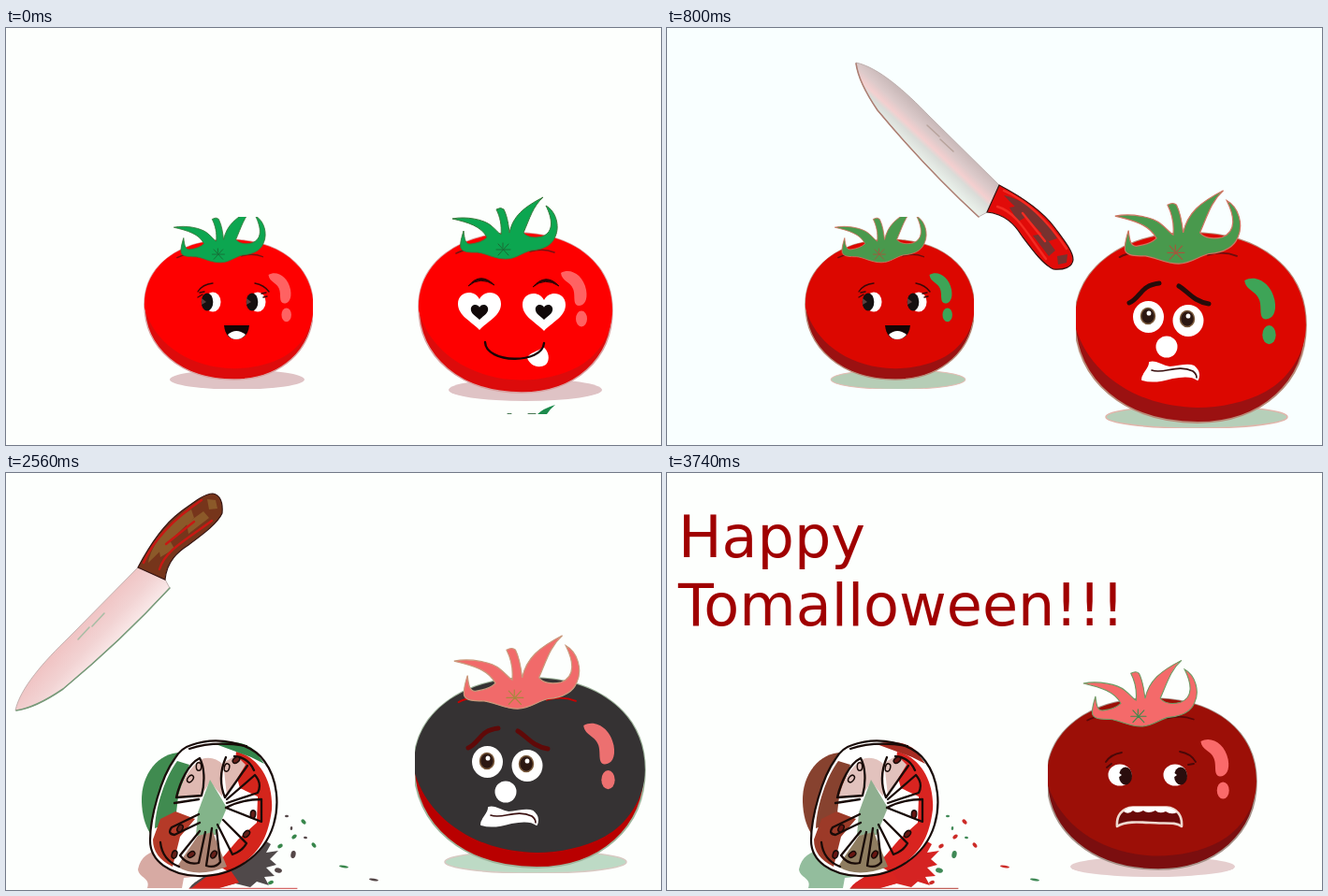
These frames come from a looping animation (700x446 px, 4.1 s). An HTML page:

```html
<!DOCTYPE html>
<html lang="en">
<head>
<meta charset="utf-8">
<title>Tomatoes</title>
<style>
html, body { margin: 0; width: 100%; height: 100%; overflow: hidden; background: #fdfffd; }
svg { display: block; width: 100vw; height: 100vh; }
text { font: 62px "DejaVu Sans", sans-serif; fill: #a00000; }
</style>
</head>
<body>
<svg id="stage" viewBox="0 0 700 446">
  <defs>
    <clipPath id="cutLeft"><path d="M100 202H328V386H100Z"/></clipPath>
    <clipPath id="cutBig"><path d="M437 150H700V428H437Z"/></clipPath>
    <clipPath id="cutLast"><path d="M407 190H700V432H407Z"/></clipPath>
    <linearGradient id="steelA" gradientUnits="userSpaceOnUse" x1="318" y1="131" x2="289" y2="162">
      <stop offset="0" stop-color="#c9b9b9"/><stop offset=".3" stop-color="#dccaca"/>
      <stop offset=".5" stop-color="#f4cfcf"/><stop offset=".62" stop-color="#d9dcd8"/><stop offset="1" stop-color="#edf5ee"/>
    </linearGradient>
    <linearGradient id="steelB" gradientUnits="userSpaceOnUse" x1="318" y1="131" x2="289" y2="162">
      <stop offset="0" stop-color="#f0c4c4"/><stop offset=".5" stop-color="#f2d3d3"/><stop offset="1" stop-color="#faeaea"/>
    </linearGradient>
  </defs>
</svg>
<script>
const stage = document.getElementById("stage");

const path = (d, fill, more = "") => `<path d="${d}" fill="${fill}" ${more}/>`;
const line = (d, color, width) =>
  path(d, "none", `stroke="${color}" stroke-width="${width}" stroke-linecap="round" stroke-linejoin="round"`);
const oval = (x, y, rx, ry, fill, more = "") =>
  `<ellipse cx="${x}" cy="${y}" rx="${rx}" ry="${ry}" fill="${fill}" ${more}/>`;
const group = (attrs, ...parts) => `<g ${attrs}>${parts.join("")}</g>`;

const BODY = "M545 219C607 219 648 252 648 302C648 354 608 390 551 390C486 390 441 352 441 298C441 251 484 219 545 219Z";
const LIT = "M545 219C607 219 648 252 648 302C648 328 632 351 612 362C590 374 562 378 540 376C492 372 452 344 441 302V298C441 251 484 219 545 219Z";
const LEAF = "M477 204C492 201 511 205 518 211C523 215 526 219 529 221C530 211 528 202 524 194Q529 191 532 194" +
  "C536 202 537 211 538 219C542 201 553 192 574 181C563 191 560 203 553 219C557 224 565 225 573 223" +
  "C586 218 584 204 577 190C588 196 592 212 587 223C583 234 572 237 561 238C552 240 545 247 534 247" +
  "C522 247 513 241 504 240C495 240 488 240 486 235C485 230 487 224 489 217C490 226 491 232 497 231" +
  "C504 230 510 228 514 224C508 212 494 208 477 204Z";

function tomato(place, c) {
  return group(`transform="matrix(${place})"`,
    path(BODY, c.shade, `stroke="${c.edge}" stroke-width="1.6"`),
    path(LIT, c.body),
    line("M481 241C490 236 498 237 506 240M560 239Q574 235 586 240", c.dark, 1.6),
    path(LEAF, c.leaf, `stroke="${c.vein}" stroke-width="1"`),
    line("M526 231L537 243M537 231L526 243M524 237H539M531 230V235", c.star, 1),
    path("M593 262C603 256 617 264 620 280C622 291 618 297 612 297C605 296 609 286 606 279C603 271 594 271 593 262Z", c.shine),
    oval(615, 311, 6, 8.5, c.shine));
}

const bright = { body: "#fe0000", shade: "#dc0b0b", edge: "#d9a0a0", leaf: "#0ca650", vein: "#3b7a3c", star: "#1a6a35", dark: "#7a1010", shine: "#ff6262" };
const dull = { body: "#dc0700", shade: "#9b1111", edge: "#b98a78", leaf: "#49994d", vein: "#cf7460", star: "#a4573c", dark: "#6d0c0c", shine: "#3ea457" };
const black = { body: "#353233", shade: "#b90000", edge: "#9fb59c", leaf: "#f16a6a", vein: "#c99a7c", star: "#a9873f", dark: "#c80000", shine: "#ec7070" };
const deep = { body: "#9c0f07", shade: "#7b0e0f", edge: "#a6938a", leaf: "#f46a6a", vein: "#6d9a63", star: "#3f8a4c", dark: "#5b0808", shine: "#fa6a6a" };

const SMALL = ".872 0 0 .875 -236.6 34.7";
const BIG = "1.193 0 0 1.187 -90.2 -41";
const LAST = "1.082 0 0 1.07 -71.2 6.7";

function happyTomato(c, shadow, rim) {
  const eye = x => oval(x + 6, 293, 8.5, 10.5, "#fff") + oval(x, 293, 6.3, 9.5, "#151010") +
    path(`M${x - 1} 293l-5 -4v7Z`, "#5a4040");
  return group('clip-path="url(#cutLeft)"',
    oval(247, 376, 72, 10.5, shadow, `stroke="${rim}"`),
    tomato(SMALL, c),
    eye(215), eye(263),
    line("M205 282Q210 274 221 273M205 288L210 285M207 283L212 282M266 273Q276 275 281 282M273 284L278 283M275 288L279 287", "#3a0808", 1.4),
    path("M233 318H260C259 328 254 333 246 333C238 333 234 327 233 318Z", "#140505"),
    path("M237 328Q246 320 256 328Q252 333 246 333T237 328Z", "#fff"));
}

function heart(x, y, s, fill) {
  return path("M0 20C-8 11 -23 5 -23 -8C-23 -22 -5 -24 0 -13C5 -24 23 -22 23 -8C23 5 8 11 0 20Z", fill,
    `transform="translate(${x} ${y}) scale(${s})"`);
}

function loveTomato() {
  return [
    oval(555, 387, 82, 12, "#dfc3c5"),
    tomato("1 0 0 1 0 0", bright),
    heart(506, 303, 1, "#fff"), heart(575, 304, 1, "#fff"),
    heart(506, 304, .4, "#100808"), heart(575, 304, .4, "#100808"),
    path("M494 276Q507 260 522 275Q507 265 494 276ZM563 277Q577 261 591 276Q576 266 563 277Z", "#2b0505", 'stroke="#2b0505"'),
    path("M557 353C560 346 568 347 574 341C580 345 582 355 577 360C569 365 560 361 557 353Z", "#fff"),
    line("M512 336C513 359 573 360 575 337", "#1a0505", 2.4),
    path("M568 413Q574 407 587 403Q582 407 578 413Z", "#1c8a4c"),
    line("M536 412.5h4M558 412.5h8", "#4a7a55", 1)
  ].join("");
}

function scaredTomato(c, shadow, rim, brow) {
  const eye = (x, y, px, py) => oval(x, y, 16.5, 17, "#fff") +
    oval(px, py, 7.5, 8.5, "#2b1712", 'stroke="#7a5a3c" stroke-width="1.5"') + oval(px + 1, py - 3, 2.4, 2.6, "#fff");
  return group('clip-path="url(#cutBig)"',
    oval(566, 416, 97, 12, shadow, `stroke="${rim}" stroke-width="1.5"`),
    tomato(BIG, c),
    line("M494 294C506 289 506 275 526 273M547 276C557 282 562 292 579 295", brow, 5),
    eye(514.5, 309, 514, 308), eye(557, 313, 556, 311),
    oval(534, 341, 11.5, 11.5, "#fff"),
    path("M508 376C508 369 516 365 516 358C522 355 528 362 537 363C548 363 555 358 563 362C568 366 569 371 567 376C561 371 550 372 540 374C530 377 517 379 508 376Z", "#fff",
      'stroke="#fff" stroke-width="2" stroke-linejoin="round"'),
    line("M518 366C530 371 545 359 562 367Q566 370 566 374", "#3a1010", 1.6));
}

function shockedTomato() {
  const eye = x => oval(x, 323, 12.5, 11.5, "#fff") + oval(x + 6, 324, 7, 9.5, "#2a0d0d") + path(`M${x + 2} 323l-4 -3v6Z`, "#fff");
  return group('clip-path="url(#cutLast)"',
    oval(519, 421, 88, 11, "#e5cece"),
    tomato(LAST, deep),
    eye(484), eye(543),
    line("M469 309Q474 301 486 299M470 315L475 311M548 298Q560 300 565 309M557 312L563 311", "#4a0808", 1.8),
    path("M481 378C480 367 486 358 498 357.5H534C545 358 551 367 550 378C545 374 538 374.5 526 374.5C510 374 492 371 481 378Z", "#6a0909",
      'stroke="#efd9d0" stroke-width="2.6" stroke-linejoin="round"'),
    path("M488 362Q492 357 500 357H532Q541 358 545 363Q539 366 533 362Q526 365 522 361Q514 365 509 361Q502 365 498 361Q493 366 488 362Z", "#fff"));
}

function knife(steel, edge, grip, patch, glow, mark) {
  return [
    path("M202 37C226 42 255 68 280 94L355 168L344 196L333 202C295 167 255 124 225 88C210 66 204 52 202 37Z", `url(#${steel})`, 'stroke="#b5a6a4" stroke-width=".8"'),
    line("M202 38C204 52 210 66 225 88C255 124 295 167 333 202", edge, 1.6),
    line("M278 104L291 116M292 119L306 132", mark, 1.6),
    path("M355 168C374 178 399 193 414 213C425 228 434 239 434 248C433 256 424 259 413 258C402 253 391 238 379 222C372 211 362 199 342 197Z", grip, 'stroke="#351512" stroke-width="1.2"'),
    path("M360 179C378 182 402 199 417 225L408 228C393 211 377 197 360 179Z", patch),
    path("M366 192L377 190L384 202L375 207ZM391 222L402 220L415 238L408 244ZM417 244L428 242L427 251L418 253Z", patch),
    line("M360 174C381 183 404 202 427 236M353 191C374 197 386 222 405 247M380 198L404 228", glow, 2.4)
  ].join("");
}

const SLICE = "M198 291C225 281 262 288 276 308C291 328 292 356 286 376C276 410 242 432 205 431C175 430 154 415 154 393C154 368 166 325 180 306Q187 294 198 291Z";

function slicedTomato(c) {
  const seeds = [[206, 314], [197, 327], [236, 315], [246, 307], [186, 380], [264, 365], [257, 386], [180, 408], [198, 408], [222, 408]];
  const drops = [[300, 367, 2], [318, 373, 3], [305, 380, 2], [308, 389, 3], [320, 390, 2], [329, 398, 3], [307, 408, 4], [293, 399, 3], [291, 425, 4], [361, 421, 5], [393, 435, 5], [283, 438, 3]];
  return [
    path("M187 299C163 299 144 322 145 352C146 380 158 396 174 402L214 350L216 304Z", c.back),
    path("M141 424C144 408 157 402 172 404L214 413C217 428 205 432 190 433L188 444H151C155 433 142 433 141 424Z", c.spillA),
    path("M196 444C203 433 217 434 216 420L250 398L275 392L283 397L278 406L291 404L282 413L289 419L278 422L287 431L276 432L281 441L268 437L261 443L245 439L226 444Z", c.spillB),
    path("M198 444L218 429L240 425L249 438L228 444Z", c.flesh),
    path(SLICE, "#fff"),
    path("M246 298C272 304 286 332 284 360C280 394 266 414 237 426L225 419L248 392L268 374L269 346L250 337L244 316Z", c.flesh),
    path("M224 290C238 286 257 287 267 298L276 311L262 304Z", c.cap),
    path("M183 308L196 312L184 346L181 372L159 380C160 355 171 324 183 308Z", c.back),
    path("M157 392L165 370L181 362L202 370L186 389L178 421Q157 411 157 392Z", c.rind),
    path("M209 306Q222 302 232 312L231 346L218 330L208 347L184 346Q190 319 209 306Z", c.pale),
    path("M218 328L236 358L224 387L203 388L205 363Z", c.core),
    path("M190 410L205 388L221 384L236 421Q204 434 183 421Z", c.pulp),
    path("M232 310L246 302L256 312L236 345Z", c.pale),
    line(SLICE, "#190b08", 2.2),
    line("M196 295Q222 286 257 292", "#190b08", 2.2),
    line("M207 305C195 311 186 330 182 347L209 345C213 330 212 314 207 305ZM235 304C228 320 229 335 234 347L258 313M236 349L266 323Q274 332 269 342L236 353M235 358Q252 349 273 349L273 373L235 358M180 353L206 349M206 365L177 379Q172 386 180 387L207 374M207 383L186 409Q194 420 206 417L213 384M220 380L214 420Q224 423 229 416L225 382M226 376L242 408Q253 404 257 396L232 371M244 303Q259 304 265 318M165 395Q167 414 185 421", "#190b08", 2.3),
    ...seeds.map(([x, y], i) => oval(x, y, 2.7, 4.2, i < 3 ? "none" : c.seed, `stroke="#190b08" stroke-width="1.5" transform="rotate(${i * 37 % 60} ${x} ${y})"`)),
    ...drops.map(([x, y, r], i) => oval(x, y, r, r > 4 ? 1.2 : r * .65, i % 2 ? c.dropA : c.dropB, `transform="rotate(${r > 4 ? 10 : i * 47} ${x} ${y})"`)),
    line("M196 444.3H311", c.floor, 1)
  ].join("");
}

const sliceA = { back: "#408b50", spillA: "#d7aaa3", spillB: "#50494a", flesh: "#d4251c", cap: "#34854b", rind: "#b53a28", pale: "#dfb9b2", pulp: "#ab8272", core: "#83b48a", seed: "#66201a", dropA: "#38864b", dropB: "#544647", floor: "#c44" };
const sliceB = { back: "#87422f", spillA: "#93bd9d", spillB: "#d52322", flesh: "#d92420", cap: "#a72c22", rind: "#9c3a28", pale: "#e2c2bd", pulp: "#8f7d60", core: "#8faf90", seed: "#681612", dropA: "#cc2b27", dropB: "#3f8956", floor: "#b43a32" };

const knifeA = knife("steelA", "#ad7f73", "#e10b09", "#77322f", "#f42b22", "#b8a49d");
const knifeB = knife("steelB", "#779a79", "#76351b", "#8b5929", "#c81813", "#a9bda5");

const scenes = [
  { end: 800, back: "#fdfffd", art: happyTomato(bright, "#dfc3c5", "none") + loveTomato() },
  { end: 1600, back: "#f9ffff", art: happyTomato(dull, "#b6cdb6", "#e6bcb4") + knifeA + scaredTomato(dull, "#b6cfb9", "#e2b5ab", "#260c0a") },
  { end: 3200, back: "#fdfffd", art: group('transform="translate(10 254) rotate(-90) translate(-202 -37)"', knifeB) +
      slicedTomato(sliceA) + scaredTomato(black, "#bddac5", "#d8c9c2", "#5f0908") },
  { end: 4100, back: "#fdfffd", art: '<text x="12" y="90">Happy</text><text x="12" y="163">Tomalloween!!!</text>' +
      slicedTomato(sliceB) + shockedTomato() }
];

stage.insertAdjacentHTML("beforeend", scenes.map(s =>
  group('class="scene" display="none"', `<rect width="700" height="446" fill="${s.back}"/>`, s.art)).join(""));
const layers = [...stage.querySelectorAll(".scene")];

function draw(time) {
  const t = time % 4100;
  const current = scenes.findIndex(s => t < s.end);
  layers.forEach((layer, i) => layer.setAttribute("display", i === current ? "inline" : "none"));
}

const start = performance.now();
function tick() {
  draw(performance.now() - start);
  requestAnimationFrame(tick);
}
tick();
</script>
</body>
</html>
```
